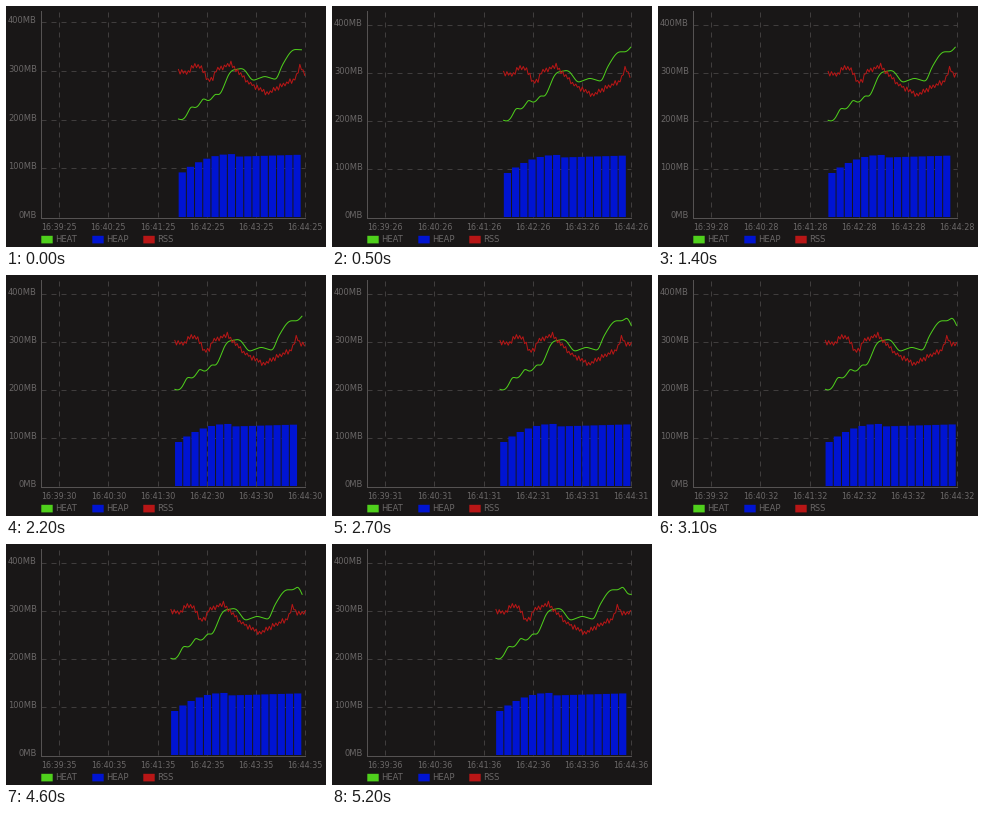
These frames come from a looping animation (320x241 px, 5.3 s). A matplotlib script:

```python
import matplotlib.pyplot as plt
import numpy as np
from matplotlib.animation import FuncAnimation
from matplotlib.patches import Rectangle

W, H, DPI = 320, 241, 100
PX = 72 / DPI                      # points per pixel
FRAMES, INTERVAL = 53, 100

BG, AXIS, GRID, TEXT = "#191717", "#555252", "#403d3d", "#6a6767"
GREEN, BLUE, RED = "#4fd01c", "#0014d2", "#b81616"

LEFT, RIGHT, TOP, BASE = 34.5, 299, 5, 211
TICKS = [53.3 + 49.1 * i for i in range(6)]
PX_PER_SEC = 0.82
SEC_PER_FRAME = 0.2
START = 172.45                     # x of the first sample at time zero
EDGE = RIGHT + 0.4                 # samples appear left of this x
HEAT_STEP, HEAP_STEP, RSS_STEP = 5, 10, 2
PEAK = 31                          # index of the highest heat sample


def heat_data():
    """Rise through a few key points, with a wobble that fades out."""
    t = HEAT_STEP * np.arange(34)
    keys = [(0, 193), (15, 221), (30, 238), (50, 251), (65, 303), (80, 304),
            (90, 279), (105, 289), (120, 281), (125, 307), (138, 344),
            (150, 343), (155, 353), (160, 334)]
    wobble = 8 * np.cos(2 * np.pi * t / 15) * np.clip(2 - t / 40, 0, 1)
    return np.interp(t, *zip(*keys)) + wobble


def heap_data():
    """Ease up to a ceiling, drop a little, then creep up again."""
    i = np.arange(16)
    return np.where(i < 7, 129 - 37.5 * (1 - i / 6) ** 2, 124 + 0.5 * (i - 7))


def rss_data():
    """Slow swings through key points with a seeded zigzag on top."""
    j = np.arange(84)
    keys = [(0, 297), (13, 295), (17, 309), (26, 310), (36, 282), (41, 282),
            (47, 303), (64, 314), (72, 300), (84, 278), (108, 252),
            (130, 274), (143, 283), (148, 311), (154, 295), (166, 298)]
    zigzag = (-1.0) ** j * np.random.default_rng(4).uniform(1, 6, j.size)
    return np.interp(RSS_STEP * j, *zip(*keys)) + zigzag


HEAT, HEAP, RSS = heat_data(), heap_data(), rss_data()


def basis_curve(pts, steps=8):
    """Cubic B-spline that touches its first and last point."""
    p = np.vstack([pts[:1], pts[:1], pts, pts[-1:], pts[-1:]])
    t = np.linspace(0, 1, steps, endpoint=False)[None, :, None]
    a, b, c, d = (p[i:len(p) - 3 + i, None, :] for i in range(4))
    curve = ((1 - t) ** 3 * a + (3 * t**3 - 6 * t**2 + 4) * b
             + (-3 * t**3 + 3 * t**2 + 3 * t + 1) * c + t**3 * d) / 6
    return np.vstack([curve.reshape(-1, 2), pts[-1:]])


fig = plt.figure(figsize=(W / DPI, H / DPI), dpi=DPI, facecolor=BG)
ax = fig.add_axes([0, 0, 1, 1])
ax.set_xlim(0, W)
ax.set_ylim(H, 0)
ax.axis("off")


def line(xs, ys, color, z, **kw):
    return ax.plot(xs, ys, color=color, lw=PX, zorder=z, **kw)[0]


def rect(x, y, w, h, color):
    return ax.add_patch(Rectangle((x, y), w, h, color=color, lw=0,
                                  zorder=2, snap=False))


def label(x, y, s, size=8, ha="left"):
    return ax.text(x, y, s, color=TEXT, fontsize=size * PX, ha=ha,
                   va="baseline", family="DejaVu Sans")


def row_label(y, s):
    return label(31, y, s, 8.4, "right")


dash = dict(dashes=(5, 5), dash_capstyle="butt")
for x in TICKS:
    line([x, x], [BASE, TOP], GRID, 1, **dash)
rows = [line([LEFT, RIGHT], [0, 0], GRID, 1, **dash) for _ in range(4)]
line([LEFT, LEFT], [TOP, BASE + 0.5], AXIS, 5)
line([LEFT, RIGHT], [BASE + 0.5] * 2, AXIS, 5)

row_label(BASE + 1.4, "0MB")
row_labels = [row_label(0, f"{i}00MB") for i in range(1, 5)]
time_labels = [label(x, 224, "", ha="center") for x in TICKS]

for x, name, color in [(35, "HEAT", GREEN), (86, "HEAP", BLUE), (137, "RSS", RED)]:
    rect(x + 0.3, 229.8, 11.4, 7.6, color)
    label(x + 14, 236.2, name, 8.4)

bars = [rect(0, BASE, 0, 0, BLUE) for _ in HEAP]
heat_line = line([], [], GREEN, 3)
rss_line = line([], [], RED, 4)


def visible(values, step, start, scale):
    """Pixel points of the samples that have already arrived."""
    x = start + PX_PER_SEC * step * np.arange(len(values))
    return np.column_stack([x, BASE - values * scale])[x <= EDGE]


def update(n):
    start = START - PX_PER_SEC * SEC_PER_FRAME * n
    arrived = int((EDGE - start) / (PX_PER_SEC * HEAT_STEP)) + 1
    # the vertical scale shrinks once the highest sample is in
    scale = 0.481 if arrived > PEAK else 0.4875

    for i, (row, text) in enumerate(zip(rows, row_labels), 1):
        y = BASE - 100 * i * scale
        row.set_ydata([y, y])
        text.set_y(y + 1.2)

    sec = int(25.9 + SEC_PER_FRAME * n + 1e-6)
    for i, text in enumerate(time_labels):
        text.set_text(f"16:{39 + i}:{sec:02d}")

    heat_line.set_data(*basis_curve(visible(HEAT, HEAT_STEP, start, scale)).T)
    rss_line.set_data(*visible(RSS, RSS_STEP, start, scale).T)

    for i, (bar, value) in enumerate(zip(bars, HEAP)):
        x = start + 0.2 + HEAP_STEP * PX_PER_SEC * i
        height = value * scale if 2 * i + 2 < arrived else 0
        bar.set_bounds(x, BASE - height, np.clip(RIGHT - x, 0, 7.2), height)
    return []


anim = FuncAnimation(fig, update, frames=FRAMES, interval=INTERVAL,
                     repeat=True, repeat_delay=0, blit=False)
plt.show()
```
